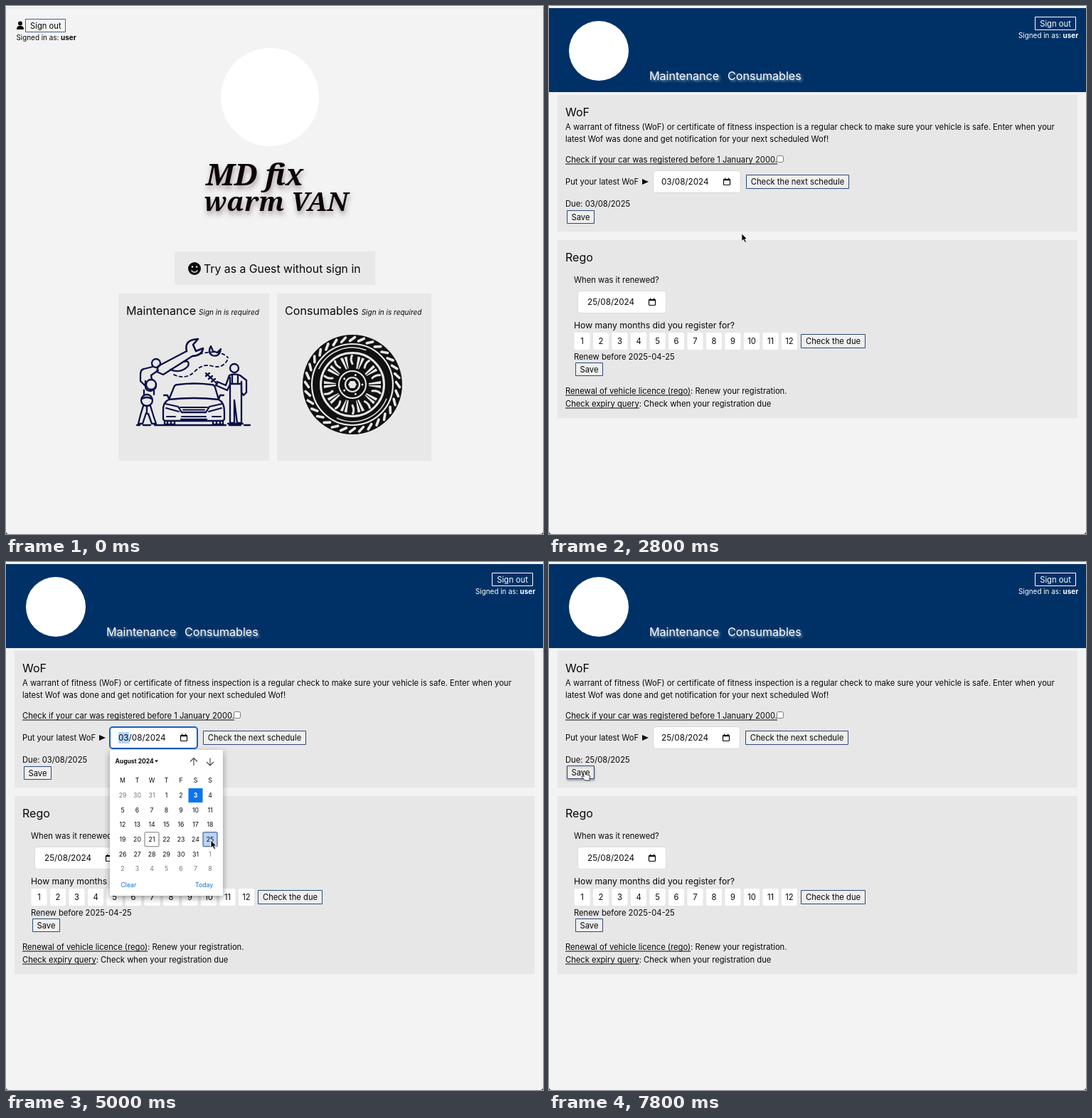
Write an HTML page with a canvas that moves like this. It is 755 px wide and 742 px high and loops after 8000 ms.

```html
<!DOCTYPE html>
<html lang="en">
<head>
<meta charset="utf-8">
<title>Car care demo</title>
<style>
html, body { margin: 0; width: 100%; height: 100%; overflow: hidden; background: #f3f3f3; }
canvas { display: block; }
</style>
</head>
<body>
<canvas id="stage" width="755" height="742"></canvas>
<script>
const c = document.getElementById('stage').getContext('2d');
const LOOP = 8000, TAU = Math.PI * 2;
const BG = '#f3f3f3', CARD = '#e8e8e8', NAVY = '#003166', INK = '#080808', DRAW = '#0a0f45';
const FONT = 'Inter, "Liberation Sans", sans-serif';
const BODY = 11.23;
const USER = 'user';

// ---- helpers ----
function text(s, x, y, size = BODY, o = {}) {
  c.font = `${o.style || ''} ${size}px ${FONT}`;
  c.fillStyle = o.color || INK;
  c.textAlign = o.align || 'left';
  c.fillText(s, x, y + size * 0.36);
  return c.measureText(s).width;
}

function box(x, y, w, h, fill, line, lw = 1, r = 0) {
  c.beginPath();
  c.roundRect(x, y, w, h, r);
  if (fill) { c.fillStyle = fill; c.fill(); }
  if (line) { c.strokeStyle = line; c.lineWidth = lw; c.stroke(); }
}

function disc(x, y, r, fill, line, lw = 1) {
  c.beginPath();
  c.arc(x, y, r, 0, TAU);
  if (fill) { c.fillStyle = fill; c.fill(); }
  if (line) { c.strokeStyle = line; c.lineWidth = lw; c.stroke(); }
}

function path(d, line, lw = 1, fill) {
  const p = new Path2D(d);
  if (fill) { c.fillStyle = fill; c.fill(p); }
  if (line) { c.strokeStyle = line; c.lineWidth = lw; c.stroke(p); }
}

function withShadow(color, blur, dx, dy, draw) {
  c.save();
  c.shadowColor = color;
  c.shadowBlur = blur;
  c.shadowOffsetX = dx;
  c.shadowOffsetY = dy;
  draw();
  c.restore();
}

function link(s, x, y) {
  const w = text(s, x, y);
  c.fillStyle = INK;
  c.fillRect(x, y + 5.5, w, 1);
  return x + w;
}

function button(label, x, y, w, h, hover) {
  const draw = () => box(x + .5, y + .5, w, h, '#efefef', '#2c4a78');
  if (hover) withShadow('rgba(0,0,0,.3)', 3, 0, 2, draw);
  else draw();
  text(label, x + w / 2 + .5, y + h / 2 + .5, BODY, { align: 'center' });
}

function signedIn(x, y, color) {
  const w = text('Signed in as: ', x, y, 9.9, { color });
  text(USER, x + w, y, 9.9, { color, style: 'bold' });
}

// ---- home page ----
function guestCards() {
  box(237, 345, 282, 47, CARD);
  box(158, 404, 212, 235, CARD);
  box(381, 404, 217, 235, CARD);
}

function wordmark() {
  withShadow('rgba(90,70,75,.5)', 7, 1, 5, () => {
    c.fillStyle = '#0c0406';
    c.textAlign = 'left';
    c.font = 'italic bold 42px "Noto Serif", "Liberation Serif", serif';
    c.fillText('MD fix', 281, 252);
    c.font = 'italic bold 37px "Noto Serif", "Liberation Serif", serif';
    c.fillText('warm VAN', 278, 288);
  });
}

function workshop() {
  const line = (d, lw = 2.3) => path(d, DRAW, lw);
  const ring = (x, y, r) => disc(x, y, r, null, DRAW, 2.3);
  c.save();
  c.lineCap = c.lineJoin = 'round';
  // ground
  line('M184 589H188M193 589H203M209 589H309M314 589H330M335 589H343');
  // car
  line('M229 553L236 536Q237 532 242 532Q265 529 288 532Q293 532 294 536L299 553M229 553Q264 549 299 553');
  line('M229 553Q220 557 221 570V580Q221 583 226 583H302Q307 583 307 580V570Q307 557 299 553');
  line('M222 547H227L229 552M306 547H301L299 552M224 559L242 563L247 571H281L286 563L304 559');
  line('M225 565L243 570M303 565L285 570M245 564H283M249 567.5H279M247 577H281M226 577H238M290 577H302', 2);
  line('M223 583V588H237V584M227 584V588M232 584V588M291 584V588H305V583M296 584V588M301 584V588M246 581H282');
  // worker with the wrench
  ring(211, 502, 6);
  line('M206 507L194 510Q189 511 189 518V527L196 534M214 512L204 519L205 525');
  ring(204, 532, 7);
  line('M196 527V534Q196 541 204 541Q212 539 211 531M194 540V547M208 541V546');
  // helper below
  ring(198, 554, 8);
  line('M191 552Q198 548 205 552M198 562V573M193 562L189 575L186 587H192L197 572M203 562L207 575L211 587H205L200 573');
  // wrench and claw
  line('M214 506L254 485M221 518L262 492M214 506L212 514L221 518');
  line('M254 485Q250 469 270 468L263 476L267 485L277 481Q276 491 262 492', 2.6);
  line('M231 511Q246 517 256 506Q259 497 249 500');
  line('M288 478Q283 487 290 491Q300 494 302 482L297 487L291 485Z');
  c.setLineDash([4, 4]);
  line('M236 518Q252 526 265 514Q276 502 290 506T311 498M272 489Q300 482 312 494', 1.8);
  c.setLineDash([]);
  // worker with the drill
  ring(321, 509, 6);
  line('M314 519Q321 516 329 519L338 526V543L334 547L331 543V530M314 519L309 533L297 528L295 533L311 540L315 532');
  line('M315 522V586H321V554L325 586H331V528M315 531H330M318 519V531M326 519V531M312 587H333');
  line('M281 516L297 531M281 520L286 516M285 524L290 520M289 528L294 524');
  c.restore();
}

function tyre() {
  c.save();
  c.translate(487, 532);
  c.lineCap = 'round';
  const ring = (r, lw, a = 0, b = TAU) => {
    c.beginPath();
    c.arc(0, 0, r, a, b);
    c.lineWidth = lw;
    c.strokeStyle = CARD;
    c.stroke();
  };
  const around = (n, draw) => {
    for (let i = 0; i < n; i++) {
      c.save();
      c.rotate(i * TAU / n);
      draw(i);
      c.restore();
    }
  };
  disc(0, 0, 70, '#111');
  around(32, () => path('M61.5 -3.5L66.5 3.5', CARD, 3.6));
  ring(57, 2.2);
  ring(52, 1.5, -2.7, -1.2);
  ring(52, 1.5, .4, 2);
  ring(44.5, 3);
  around(10, () => {
    path('M23 -2L40 -5V-1L23 0Z', null, 0, CARD);
    path('M23 2L40 5V1L23 1Z', null, 0, CARD);
    path('M28 9Q35 8 39 12', CARD, 3);
  });
  ring(19, 2);
  around(5, () => disc(14, 0, 1.5, CARD));
  ring(10, 2.2);
  path('M-6 0L-3 -5H3L6 0L3 5H-3Z', null, 0, CARD);
  c.restore();
}

function home() {
  disc(20, 24.5, 3, INK);
  path('M15 33Q15 28 19 28H21Q25 28 25 33Z', null, 0, INK);
  box(27.5, 18.5, 56, 18, '#f5f5f5', '#3f6099');
  text('Sign out', 34, 27.5);
  signedIn(14.5, 44, INK);

  disc(371, 128, 69, '#fff');
  wordmark();

  guestCards();
  disc(265, 369, 9, INK);
  disc(262, 366.5, 1.3, CARD);
  disc(268, 366.5, 1.3, CARD);
  path('M260.5 371.5Q265 377 269.5 371.5', CARD, 1.3);
  text('Try as a Guest without sign in', 278, 369, 15.8);

  for (const [label, x] of [['Maintenance', 169], ['Consumables', 392]]) {
    const w = text(label, x, 428, 16.1);
    text('Sign in is required', x + w + 4, 430, 10, { style: 'italic' });
  }
  workshop();
  tyre();
}

// ---- maintenance page ----
function header() {
  box(0, 3, 755, 118, NAVY);
  disc(70, 63, 42, '#fff');
  withShadow('rgba(255,255,255,.5)', 3, 2, 2, () => {
    text('Maintenance', 141, 98.5, 16.1, { color: '#fff' });
    text('Consumables', 251, 98.5, 16.1, { color: '#fff' });
  });
  box(683.5, 15.5, 57, 18, null, '#fff');
  text('Sign out', 712, 24.5, BODY, { color: '#fff', align: 'center' });
  signedIn(660, 41.5, '#fff');
}

function dateIcon(x, y) {
  box(x - 4.5, y - 3.5, 9, 8, null, INK, 1.2, 1);
  c.fillStyle = INK;
  c.fillRect(x - 4.5, y - 4, 9, 2.2);
  c.fillRect(x - 3, y - 5.5, 1.2, 2);
  c.fillRect(x + 2, y - 5.5, 1.2, 2);
}

function maintenance(s) {
  header();
  const white = s.fresh ? BG : '#fff';
  if (s.fresh) guestCards();
  else {
    box(12, 125, 731, 192, '#e7e7e7');
    box(12, 329, 731, 250, '#e7e7e7');
  }

  text('WoF', 23, 149, 16);
  text('A warrant of fitness (WoF) or certificate of fitness inspection is a regular check to make sure your vehicle is safe. Enter when your', 23, 169.5);
  text('latest Wof was done and get notification for your next scheduled Wof!', 23, 187);
  link('Check if your car was registered before 1 January 2000.', 23, 216);
  box(320.5, 210.5, 9, 9, '#fff', '#777', 1, 2);
  text('Put your latest WoF', 23, 247);
  path('M131 243L140 247L131 251Z', null, 0, INK);

  const dx = s.picked ? -1 : 0;
  if (s.focus) box(146, 232, 123 + dx, 30, '#fff', '#1a5fc4', 2, 4);
  else box(146.5, 231.5, 123 + dx, 31, white, '#d6d6d6', 1, 4);
  if (s.focus) box(158, 239, 15, 16, '#b0d5fb');
  text(s.picked ? '25/08/2024' : '03/08/2024', 158, 247, 11.7);
  dateIcon(250 + dx, 247);
  button('Check the next schedule', 277 + dx, s.overCheck ? 236 : 237, 144, 19, s.overCheck);

  text(s.saved ? 'Due: 25/08/2025' : 'Due: 03/08/2025', 23, 278);
  const lift = s.overSave ? 1 : 0;
  button('Save', 25, 287 - lift, 38, 18, s.overSave);

  text('Rego', 23, 353, 16);
  text('When was it renewed?', 35, 385);
  box(40.5, 400.5, 124, 31, white, '#dcdcdc', 1, 4);
  text('25/08/2024', 54, 416, 11.7);
  dateIcon(145, 416);
  text('How many months did you register for?', 35, 448.5, 12.2);
  for (let i = 0; i < 12; i++) {
    const x = 46.5 + i * 26.5;
    box(x - 11, 459, 22, 24, i > 4 ? '#fff' : white, null, 0, 2);
    text(String(i + 1), x, 471, BODY, { align: 'center' });
  }
  button('Check the due', 354, 461, 90, 19);
  text('Renew before 2025-04-25', 35, 492.5);
  button('Save', 37, 501, 38, 18);
  text(': Renew your registration.', link('Renewal of vehicle licence (rego)', 23, 541), 541);
  text(': Check when your registration due', link('Check expiry query', 23, 559), 559);

  if (s.popup) calendar(s.pos);
}

function calendar([mx, my]) {
  withShadow('rgba(0,0,0,.4)', 8, 0, 3, () => box(146, 264, 159, 205, '#fff', null, 0, 2));
  text('August 2024', 153.5, 280, 8.5, { style: 'bold' });
  path('M209 278.5H214L211.5 281.5Z', null, 0, INK);
  path('M264 286V275.5M259 280.5L264 275.5L269 280.5M287 275.5V286M282 281L287 286L292 281', '#444', 1.1);

  const center = { align: 'center' };
  const colX = i => 164 + i * 20.5;
  [...'MTWTFSS'].forEach((d, i) => text(d, colX(i), 307, 8.7, center));
  for (let n = 0; n < 42; n++) {
    const x = colX(n % 7), y = 328 + Math.floor(n / 7) * 20.6;
    const day = n - 2, inMonth = day > 0 && day < 32;
    const hover = Math.abs(mx - x) < 10.2 && Math.abs(my - y) < 10.2;
    let color = inMonth ? INK : '#777';
    if (day === 3) { box(x - 10, y - 10, 20, 20, '#0b75f0'); color = '#fff'; }
    else if (hover) box(x - 10, y - 10, 20, 20, '#b9d3f8', '#2c4a78', 1, 1);
    else if (day === 21) box(x - 10, y - 10, 20, 20, null, '#777', 1, 1);
    const label = day < 1 ? day + 31 : day > 31 ? day - 31 : day;
    text(String(label), x, y, 8.7, { align: 'center', color, style: day === 3 ? 'bold' : '' });
  }
  text('Clear', 161.5, 454, 8.7, { color: '#0b70d8' });
  text('Today', 266, 454, 8.7, { color: '#0b70d8' });
}

// ---- pointer ----
const TRACK = [
  [1300, 430, 700], [1900, 262, 456], [2100, 263, 456], [3000, 272, 300],
  [3700, 254, 246], [4000, 254, 247], [4400, 291, 350], [4800, 288, 390],
  [5000, 288, 391], [5700, 344, 257], [6500, 342, 252], [7500, 51, 297], [7800, 49, 294]
];

function pointerAt(t) {
  const i = TRACK.findIndex(k => k[0] > t);
  if (i < 0) return TRACK[TRACK.length - 1].slice(1);
  const [t0, x0, y0] = TRACK[Math.max(i - 1, 0)], [t1, x1, y1] = TRACK[i];
  const u = Math.max(0, (t - t0) / (t1 - t0)), e = u * u * (3 - 2 * u);
  return [x0 + (x1 - x0) * e, y0 + (y1 - y0) * e];
}

const within = ([x, y], l, t, r, b) => x >= l && x <= r && y >= t && y <= b;

const CURSORS = {
  arrow: () => path('M0 0V11L2.6 8.7L4.6 12.8L6.6 11.9L4.7 7.9H8Z', '#fff', 1, '#000'),
  hand: () => path('M-1 1Q0 -1 1.5 1L2.6 5Q4 4 5 5.3Q6.2 4.6 7 6Q8.5 5.6 8.6 7.5L8 11V13H1.5L-3 8Q-3 6 -1 7L.2 7.6Z', '#333', 1, '#fff'),
  beam: () => path('M-2 -6Q0 -6 0 -4.5Q0 -6 2 -6M0 -5V5M-2 6Q0 6 0 4.5Q0 6 2 6M-1 2H1', '#222', 1)
};

function cursor(kind, [x, y]) {
  c.save();
  c.translate(x, y);
  c.lineJoin = 'round';
  CURSORS[kind]();
  c.restore();
}

// ---- timeline ----
function render(t) {
  const pos = pointerAt(t);
  const onHome = t < 2000;
  const popup = t >= 3900 && t < 5100;
  const overCard = within(pos, 158, 404, 370, 639);
  const overCheck = !popup && within(pos, 277, 237, 422, 258);
  const overSave = within(pos, 25, 286, 64, 306);

  box(0, 0, 755, 742, BG);
  box(0, 0, 755, 2, '#fcfcfc');
  box(0, 2, 755, 1, '#dedede');

  if (onHome) home();
  else maintenance({
    pos, popup, overCheck, overSave,
    fresh: t < 2100,
    focus: t >= 3700 && t < 6000,
    picked: t >= 5100,
    saved: t >= 6000
  });

  if (onHome ? t >= 1300 && overCard : t < 2500) {
    box(-4, 728.5, 190, 18, '#d5e3f8', '#b9c9e2', 1, 3);
    text('https://car-gp.up.railway.app/maintenance', 3, 736, 8.8, { color: '#333' });
  }
  path('M0 738Q0 742 4 742H0ZM755 738Q755 742 751 742H755Z', null, 0, '#222');

  if (t >= 1300) {
    const hand = onHome ? overCard : overCheck || overSave;
    const beam = t >= 2000 && t < 2300;
    cursor(hand ? 'hand' : beam ? 'beam' : 'arrow', pos);
  }
}

const start = performance.now();
function frame() {
  const t = (performance.now() - start) % LOOP;
  render(Math.floor(t / 100) * 100);
  requestAnimationFrame(frame);
}
frame();
</script>
</body>
</html>
```
